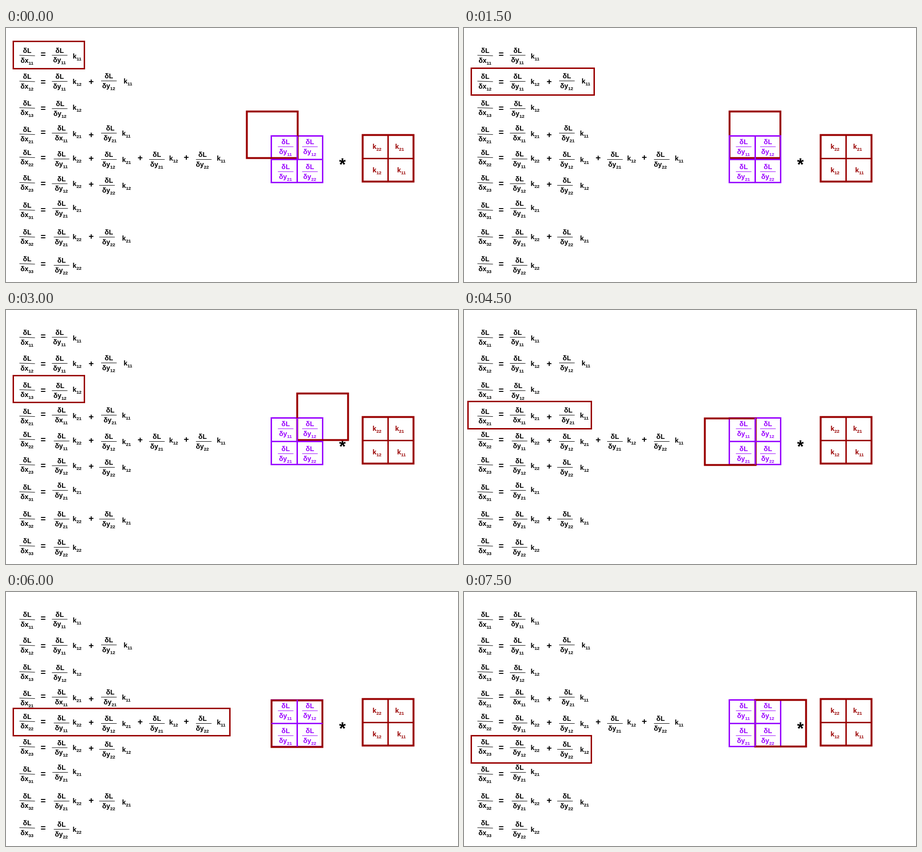
Animation of 960 by 540 pixels, one loop 8 s. Source, as an HTML page:

```html
<!DOCTYPE html>
<html lang="en">
<head>
<meta charset="utf-8">
<title>Convolution gradients</title>
<style>
  html, body { margin: 0; width: 100%; height: 100%; overflow: hidden; background: #fff; }
  svg { display: block; width: 960px; height: 540px; }
  text { font: bold 14.67px "Liberation Sans", Arial, sans-serif; text-anchor: middle; fill: currentColor; }
  .sub { font-size: 9.6px; }
  .op { font-size: 18.67px; }
  .star { font-size: 36px; }
  rect, path { fill: none; stroke: currentColor; stroke-width: 3; }
  .bar { stroke-width: 1; }
  .thick { stroke-width: 4; }
  .red { color: #990000; }
  .purple { color: #9900ff; }
</style>
</head>
<body>
<svg viewBox="0 0 960 540">
  <g id="equations"></g>
  <rect id="marker" class="red"/>
  <text class="star" x="714.5" y="303">*</text>
  <g id="gradient" class="purple">
    <rect id="frame" x="563.5" y="229.5" width="109" height="99"/>
    <path id="cross" d="M618.5 229.5V328.5M563.5 279.5H672.5"/>
  </g>
  <g id="kernel" class="red">
    <rect class="thick" x="757.5" y="227.5" width="108" height="99"/>
    <path d="M811.5 227.5V326.5M757.5 277.5H865.5"/>
  </g>
</svg>
<script>
const $ = id => document.getElementById(id);

function add(parent, tag, attrs, content = '') {
  const el = document.createElementNS('http://www.w3.org/2000/svg', tag);
  for (const name in attrs) el.setAttribute(name, attrs[name]);
  el.textContent = content;
  return parent.appendChild(el);
}

// Builders bound to one group: fraction, indexed symbol and operator.
function writer(group) {
  const symbol = (x, y, base, index) => {
    const text = add(group, 'text', { x, y }, base);
    add(text, 'tspan', { class: 'sub', dy: 4 }, index);
  };
  return {
    frac(x, y, name, barX = x, tilt = 0) {
      add(group, 'text', { x, y: y - 5.5 }, 'δL');
      add(group, 'path', { class: 'bar', d: `M${barX - 16.5} ${y - tilt}L${barX + 16.5} ${y + tilt}` });
      symbol(x - 0.5, y + 15, 'δ' + name[0], name.slice(1));
    },
    k: (x, y, index) => symbol(x, y + 5, 'k', index),
    op: (x, y, sign) => add(group, 'text', { class: 'op', x, y: y + 6.5 }, sign)
  };
}

const { frac, k, op } = writer($('equations'));
const left = (y, index, equalsY) => {
  frac(45, y, 'x' + index, 45, 0.5);
  op(79, equalsY, '=');
};

left(58.5, 11, 55);
frac(114, 58, 'y11'); k(151, 59.5, 11);

left(113.5, 12, 114);
frac(114, 113.5, 'y11'); k(151, 114, 12); op(181, 113, '+');
frac(218.5, 112.5, 'y12'); k(259, 112.5, 11);

left(170, 13, 170);
frac(115, 171.5, 'y12', 114); k(151, 168.5, 12);

left(226, 21, 221);
frac(118, 223.5, 'x11', 114); k(151, 224.5, 21); op(181, 226, '+');
frac(221.5, 223.5, 'y21', 218.5); k(255.5, 224, 11);

left(275, 22, 275);
frac(118, 278.5, 'y11'); k(151, 277, 22); op(181, 276, '+');
frac(218.5, 279.5, 'y12'); k(256, 279.5, 21); op(285, 275, '+');
frac(320.5, 279.5, 'y21'); k(356, 277, 12); op(383, 274, '+');
frac(417.5, 279.5, 'y22', 420); k(457, 277, 11);

left(329, 23, 330);
frac(118, 331, 'y12', 114); k(151, 331, 22); op(181, 331, '+');
frac(218.5, 334.5, 'y22', 214.5); k(256, 335, 12);

left(387, 31, 386);
frac(118, 383.5, 'y21', 115); k(151, 381.5, 21);

left(444, 32, 443);
frac(118, 444.5, 'y21'); k(151, 444, 22); op(181, 442, '+');
frac(218.5, 444.5, 'y22', 214.5); k(256, 446.5, 21);

left(501.5, 33, 501);
frac(118, 504.5, 'y22'); k(151, 504.5, 22);

const cells = writer($('gradient'));
cells.frac(594, 252.5, 'y11');
cells.frac(645.5, 252.5, 'y12');
cells.frac(594, 305.5, 'y21');
cells.frac(645.5, 305.5, 'y22');

const weights = writer($('kernel'));
weights.k(788, 252, 22);
weights.k(836, 252, 21);
weights.k(788, 302, 12);
weights.k(840, 302, 11);

const STEP = 1500, LOOP = 8000;
const slider = add($('gradient'), 'rect', { class: 'red thick', width: 108, height: 99 });

// marker: x, y, width, height; at: slider x, y; behind: the grid's outline covers the slider
const steps = [
  { marker: [15.5, 28.5, 151, 58], at: [511.5, 177.5] },
  { marker: [15.5, 85.5, 261, 57], at: [564, 177.5], behind: true },
  { marker: [15.5, 139.5, 151, 57], at: [618.5, 177.5] },
  { marker: [8.5, 194.5, 262, 58], at: [511.5, 230.5] },
  { marker: [15.5, 247.5, 460, 58], at: [564, 230.5] },
  { marker: [15.5, 305.5, 255, 58], at: [618.5, 229.5] }
];

const place = (el, values) =>
  ['x', 'y', 'width', 'height'].slice(0, values.length)
    .forEach((name, i) => el.setAttribute(name, values[i]));

let shown;
function show(step) {
  if (step === shown) return;
  shown = step;
  place($('marker'), step.marker);
  place(slider, step.at);
  $('gradient').insertBefore(slider, $(step.behind ? 'frame' : 'cross'));
}

const start = performance.now();
function tick() {
  show(steps[Math.floor((performance.now() - start) % LOOP / STEP)]);
  requestAnimationFrame(tick);
}
tick();
</script>
</body>
</html>
```
